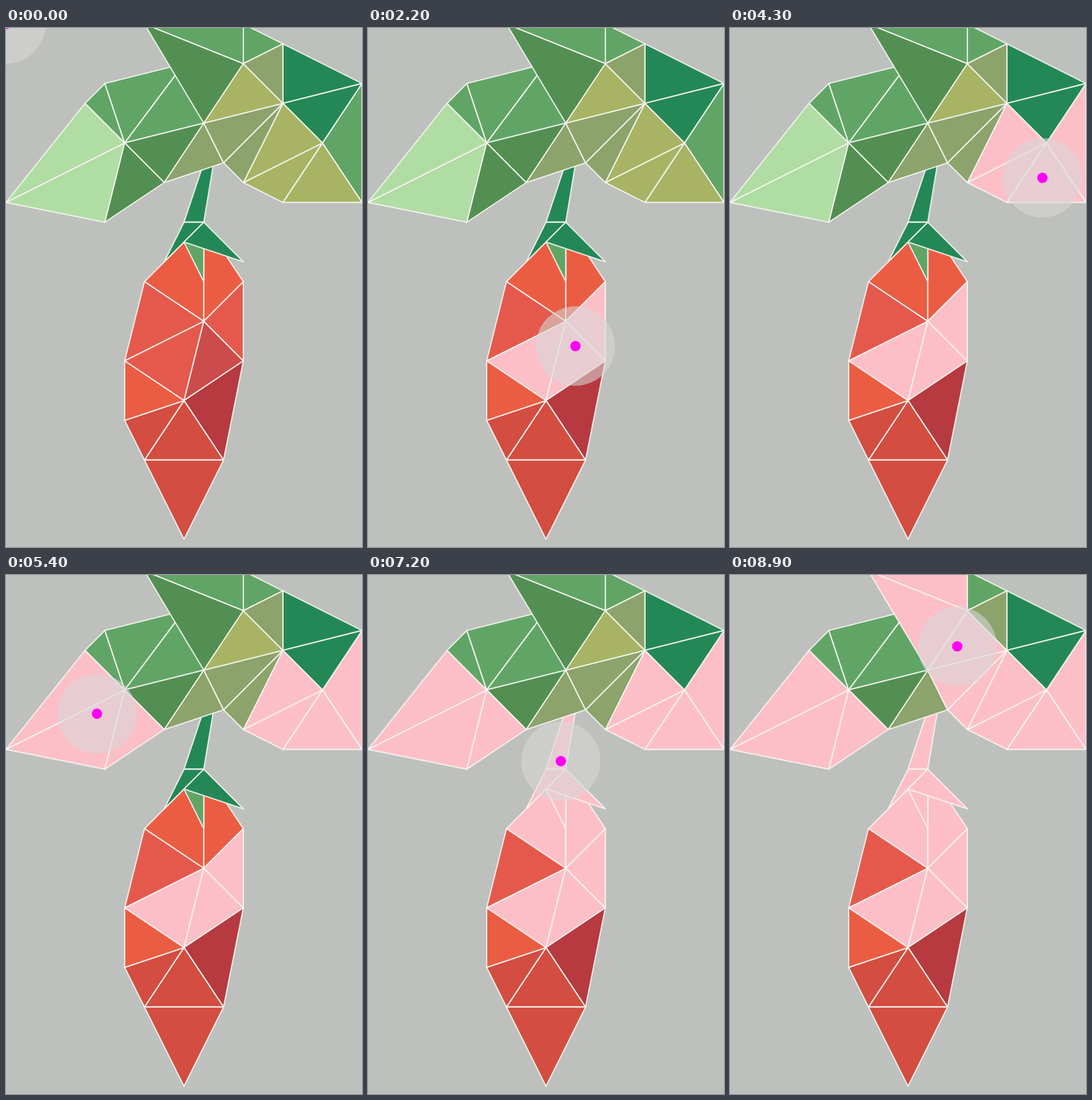
Recreate the animation shown at these times as an HTML page with a canvas. Size 600 by 873 pixels, loop 9 s.

```html
<!DOCTYPE html>
<html lang="en">
<head>
<meta charset="utf-8">
<title>Low-poly chili</title>
<style>
  html, body { margin: 0; width: 100%; height: 100%; overflow: hidden; background: #bec0bd; }
  canvas { display: block; }
</style>
</head>
<body>
<canvas id="stage" width="600" height="873"></canvas>
<script>
const ctx = document.getElementById('stage').getContext('2d');
const LOOP = 9000;
const UNIT = 100 / 3;
const PINK = '#fcbfc8';

const COLORS = {
  light: '#b0dda4', green: '#61a566', moss: '#538f52', olive: '#8ca36b',
  lime: '#a8b464', teal: '#248856', orange: '#eb5d43', red: '#e5594d',
  rose: '#cb4c4a', brick: '#d34d41', wine: '#b63a3f'
};

// Cursor stops: start time, x, y
const STOPS = [
  [0, 0, -6.7], [1100, 465, 438], [2200, 349.7, 535], [3500, 526.5, 252],
  [4600, 153.3, 233.3], [5700, 320, 413], [6600, 325, 313], [7600, 383, 120]
];

const triangles = [];

// Triangles around a hub; each skin is a colour and the stop that turns it pink
function fan(hub, ring, skins) {
  skins.split(' ').forEach((skin, i) => {
    const [color, stop] = skin.split(':');
    triangles.push({
      points: [hub, ring[i], ring[i + 1]],
      color: COLORS[color],
      stop: stop ? +stop : Infinity
    });
  });
}

// Fruit
fan([10, 10], [[7, 13], [10, 15], [12, 13]], 'orange:5 orange:5');
fan([10, 15], [[7, 13], [6, 17], [9, 19], [12, 17], [12, 13]], 'red red:2 rose:2 red:2');
fan([9, 19], [[12, 17], [11, 22], [7, 22], [6, 20], [6, 17]], 'wine brick brick orange');
fan([9, 26], [[7, 22], [11, 22]], 'brick');

// Stem and cap
fan([10, 10], [[11, 4], [9, 10], [8, 12]], 'teal:6 teal:6');
fan([9, 11], [[10, 11], [10, 13]], 'green:5');
fan([10, 10], [[9, 11], [12, 12]], 'teal:5');

// Leaves
fan([6, 6], [[5, 10], [0, 9], [4, 4], [5, 3], [9, 2], [10, 5], [8, 8], [5, 10]],
  'light:4 light:4 green green green moss moss:4');
fan([11, 7], [[10, 5], [8, 8]], 'olive');
fan([16, 6], [[18, 3], [18, 9], [14, 9], [12, 8]], 'green:3 lime:3 lime:3');
fan([12, 2], [[14, 1], [12, 0], [7, 0], [10, 5]], 'green green:7 moss:7');
fan([14, 4], [[14, 1], [18, 3], [16, 6], [12, 8], [11, 7], [10, 5], [12, 2], [14, 1]],
  'teal teal lime:3 olive:7 olive:7 lime:7 olive');

function disc(x, y, r, color) {
  ctx.beginPath();
  ctx.arc(x, y, r, 0, Math.PI * 2);
  ctx.fillStyle = color;
  ctx.fill();
}

function draw(time) {
  const now = time % LOOP;
  const current = STOPS.filter(s => s[0] <= now).length - 1;

  ctx.fillStyle = '#bec0bd';
  ctx.fillRect(0, 0, 600, 873);

  ctx.lineWidth = 2.1;
  ctx.lineJoin = 'round';
  ctx.strokeStyle = 'rgba(245, 246, 240, 0.9)';
  for (const tri of triangles) {
    ctx.beginPath();
    for (const [x, y] of tri.points) ctx.lineTo(x * UNIT, (y - 0.2) * UNIT);
    ctx.closePath();
    ctx.fillStyle = current >= tri.stop ? PINK : tri.color;
    ctx.fill();
    ctx.stroke();
  }

  const [, x, y] = STOPS[current];
  disc(x, y, 66.7, 'rgba(217, 217, 216, 0.57)');
  disc(x, y, 8.7, '#ff00f8');
}

const start = performance.now();
function tick() {
  draw(performance.now() - start);
  requestAnimationFrame(tick);
}
tick();
</script>
</body>
</html>
```
